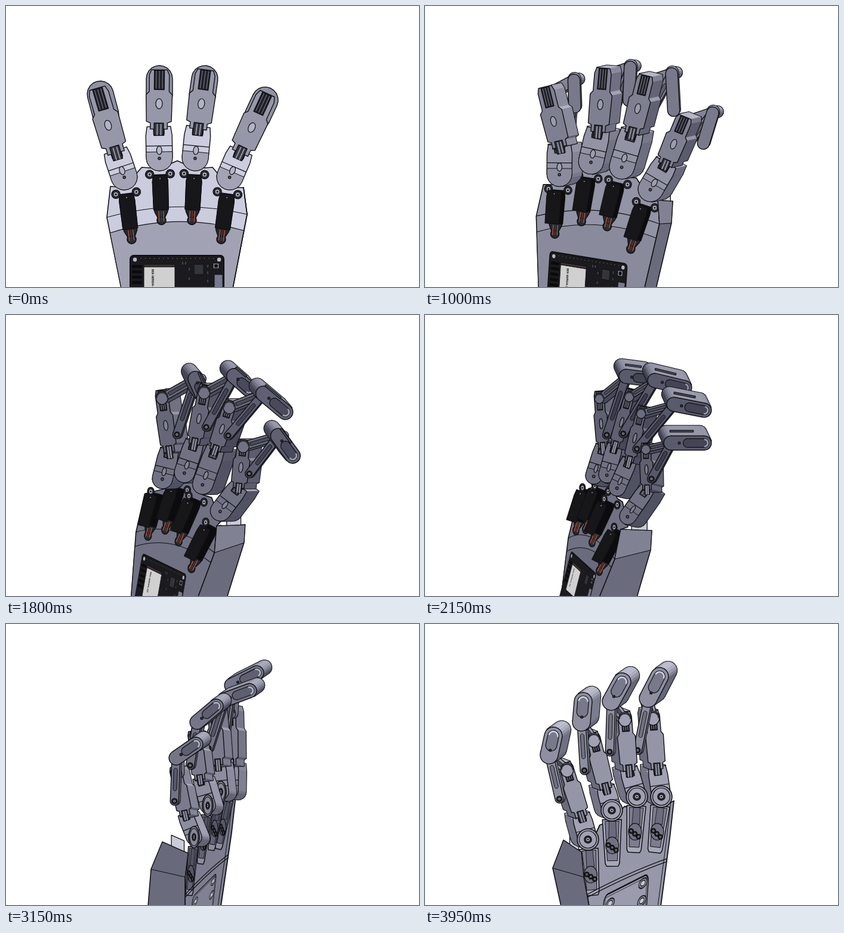
These frames come from a looping animation (692x472 px, 4.4 s). An HTML page with a canvas:

```html
<!DOCTYPE html>
<html lang="en">
<head>
<meta charset="utf-8">
<title>Robot hand</title>
<style>
html, body { margin: 0; width: 100%; height: 100%; overflow: hidden; background: #fff; }
canvas { display: block; }
</style>
</head>
<body>
<canvas id="stage" width="692" height="472"></canvas>
<script>
const ctx = document.getElementById('stage').getContext('2d');
const LOOP = 4400, INK = '#101014';

// Start of each evenly turned step, in ms.
const STEPS = [0, 250, 400, 600, 700, 850, 1000, 1150, 1300, 1400, 1550, 1700, 1800, 1900, 2050, 2150,
  2300, 2400, 2500, 2600, 2700, 2800, 2950, 3050, 3150, 3250, 3350, 3500, 3600, 3700, 3850, 3950];
const KEYS = [0, 3, 10, 15, 19, 24, 31];

// Joints per key: knuckle, middle joint, upper joint, tip base, tip.
const little = [
  [198,287, 184,245, 157,152, 158,148, 167,182],
  [209,285, 203,238, 178,155, 207,135, 214,180],
  [249,278, 257,232, 241,140, 300,112, 300,150],
  [283,270, 298,222, 292,140, 337,103, 375,108],
  [310,270, 325,215, 323,140, 357,107, 415,96],
  [376,280, 377,235, 375,150, 378,103, 420,82],
  [396,290, 389,242, 382,158, 374,125, 393,88]];
const ring = [
  [257,255, 256,205, 257,120, 257,122, 257,150],
  [266,260, 272,208, 278,115, 312,108, 306,175],
  [294,263, 311,212, 322,125, 375,100, 385,130],
  [305,268, 318,220, 342,137, 385,110, 435,122],
  [314,275, 325,222, 342,140, 384,122, 445,125],
  [360,282, 355,235, 348,150, 365,128, 408,112],
  [355,290, 342,245, 335,160, 312,130, 330,97]];
const middle = [
  [317,255, 322,205, 333,120, 333,122, 329,150],
  [325,262, 338,212, 354,118, 388,112, 378,178],
  [333,280, 353,215, 377,147, 432,122, 458,165],
  [322,290, 342,245, 362,165, 417,150, 468,160],
  [320,300, 330,250, 343,175, 378,160, 438,150],
  [338,305, 325,260, 315,190, 320,165, 352,138],
  [313,313, 303,275, 283,195, 262,165, 265,130]];
const index = [
  [375,287, 393,245, 432,160, 434,158, 421,186],
  [380,297, 403,250, 440,180, 473,168, 450,212],
  [370,322, 397,285, 412,215, 476,195, 480,245],
  [340,338, 372,292, 370,225, 412,215, 468,215],
  [325,340, 332,300, 328,235, 357,226, 413,212],
  [315,358, 300,320, 285,250, 285,225, 318,202],
  [273,362, 262,322, 238,245, 208,220, 215,188]];
const FINGERS = [little, ring, middle, index];

// Palm edges: far edge, near back edge, near front edge (top, bend, x at the bottom).
const PALM = [
  [175,303, 169,355, 193, 398,305, 404,350, 380, 398,305, 404,350, 380],
  [186,300, 175,350, 187, 402,310, 406,350, 383, 413,315, 412,358, 390],
  [218,300, 205,360, 200, 368,348, 368,390, 340, 410,345, 408,375, 378],
  [258,300, 240,375, 228, 328,360, 318,410, 292, 380,362, 378,395, 355],
  [292,295, 270,400, 250, 300,365, 288,415, 267, 350,372, 345,402, 330],
  [385,288, 378,350, 360, 262,366, 243,412, 238, 305,385, 300,425, 300],
  [417,297, 410,360, 395, 232,363, 214,410, 228, 262,383, 266,425, 275]];

// Tones, half widths, depth of segment and tip, link offset, servo direction, spread, half width.
const LOOK = [
  [150,203, 22,22,22,  0,0,   0,0,    0,0,   -1,105,-9, 13],
  [140,172, 20,22,10, 12,-3,  8,2,   20,-5, -10,102,-8, 13],
  [108,118, 16,19,13, 20,-3, -10,-9, 20,-8, -33,98,-9, 11],
  [95,112,  11,14,12, 17,4,  -8,-17,  8,0,  -39,92,-6, 9],
  [98,108,  11,13,12, 12,3,  -3,-13,  4,0,  -40,80,-5, 7],
  [122,140, 13,13,12, 13,2,  13,-9, -14,-5, -14,96,4, 8],
  [148,160, 15,16,15, -13,-5, 14,-10, -31,-9, -2,92,6, 16]];

// Plate on the palm: corner, right edge, down edge.
const PLATE = [
  [208,419, 157,0, 0,100], [205,417, 152,13, -3,100], [220,405, 93,30, -12,100],
  [245,397, 42,38, -22,85], [262,408, 6,10, -12,70], [313,458, 40,-40, -8,70], [300,457, 75,-38, -6,90]];

const add = (a, b, k = 1) => [a[0] + b[0] * k, a[1] + b[1] * k];
const mix = (a, b, k) => [a[0] + (b[0] - a[0]) * k, a[1] + (b[1] - a[1]) * k];
const pairs = a => a.flatMap((x, i) => i % 2 ? [] : [[x, a[i + 1]]]);
const grey = g => `rgb(${g | 0},${g + 2 | 0},${Math.min(255, g + 19) | 0})`;
const area = p => p.reduce((s, a, i) => {
  const b = p[(i + 1) % p.length];
  return s + a[0] * b[1] - b[0] * a[1];
}, 0);

// Smooth path through the keys.
function at(rows, s) {
  let i = 0;
  while (i < KEYS.length - 2 && s >= KEYS[i + 1]) i++;
  const span = KEYS[i + 1] - KEYS[i], k = (s - KEYS[i]) / span;
  const slope = (n, c) => {
    const a = Math.max(0, n - 1), b = Math.min(KEYS.length - 1, n + 1);
    return (rows[b][c] - rows[a][c]) / (KEYS[b] - KEYS[a]) * span;
  };
  return rows[i].map((p, c) => {
    const q = rows[i + 1][c], d = q - p, m = slope(i, c), n = slope(i + 1, c);
    return p + k * m + k * k * (3 * d - 2 * m - n) + k * k * k * (m + n - 2 * d);
  });
}

function shape(pts, fill, line = 1.4, ink = INK) {
  ctx.beginPath();
  pts.forEach(p => ctx.lineTo(...p));
  ctx.closePath();
  if (fill) { ctx.fillStyle = fill; ctx.fill(); }
  if (line) { ctx.lineWidth = line; ctx.strokeStyle = ink; ctx.stroke(); }
}

function stroke(pts, width = 1.2, ink = INK) {
  ctx.beginPath();
  pts.forEach(p => ctx.lineTo(...p));
  ctx.lineWidth = width;
  ctx.strokeStyle = ink;
  ctx.stroke();
}

function oval(p, rx, ry, fill, turn = 0, line = 1.2) {
  ctx.beginPath();
  ctx.ellipse(...p, Math.abs(rx), Math.abs(ry), turn, 0, 7);
  ctx.fillStyle = fill;
  ctx.fill();
  if (line) { ctx.lineWidth = line; ctx.strokeStyle = INK; ctx.stroke(); }
}

function bolt(p, r, rx = r) {
  oval(p, rx, r, '#33343c', 0, 1.5);
  oval(p, rx * .6, r * .6, '#a9abb8');
  oval(p, rx * .22, r * .22, INK, 0, 0);
}

const angle = (a, b) => Math.atan2(b[1] - a[1], b[0] - a[0]);
const arc = (c, r, from) => Array.from({ length: 11 }, (_, i) => {
  const t = from + i * Math.PI / 10;
  return add(c, [Math.cos(t), Math.sin(t)], r);
});
function pill(a, b, r) {
  const t = angle(a, b);
  return [...arc(b, r, t - Math.PI / 2), ...arc(a, r, t + Math.PI / 2)];
}

// Local frame of a segment: x across in half widths, y along from a to b.
function frame(a, b, w) {
  const t = angle(a, b), side = [-Math.sin(t) * w, Math.cos(t) * w];
  return (x, y) => add(mix(a, b, y), side, x);
}

// Flat face pushed back along v, lit from above.
function prism(pts, v, g, face = grey(g)) {
  const sign = Math.sign(area(pts)) || 1, sides = [];
  pts.forEach((a, i) => {
    const b = pts[(i + 1) % pts.length], l = Math.hypot(b[0] - a[0], b[1] - a[1]) || 1;
    const nx = sign * (b[1] - a[1]) / l, ny = sign * (a[0] - b[0]) / l;
    if (nx * v[0] + ny * v[1] > .1)
      sides.push([[a, b, add(b, v), add(a, v)], grey(g * .72 + 95 * Math.max(0, nx * .3 - ny * .9))]);
  });
  sides.forEach(([q]) => shape(q, null, 2.6));
  sides.forEach(([q, c]) => shape(q, c, .5, c));
  shape(pts, face);
}

function proximal(K, P, o) {
  const m = frame(K, P, o.pw), round = arc(K, o.pw, angle(K, P) + Math.PI / 2);
  prism([...round, m(-1, .75), m(-.9, 1.05), m(-.4, 1.05), m(-.4, .8), m(.4, .8), m(.4, 1.05),
    m(.9, 1.05), m(1, .75)], o.v, o.top);
  shape([m(-.38, .75), m(-.38, 1.1), m(.38, 1.1), m(.38, .75)], '#3c3d47');
  for (const x of [-.15, .15]) stroke([m(x, .78), m(x, 1.1)], 2.5, grey(o.g + 10));
  shape([...round, m(-1, .2), m(1, .2)], grey(o.g + 12), 1);
  stroke([m(-1, .4), m(1, .4)]);
  if (o.back) {
    oval(m(0, .25), o.pw * .2, 7, grey(o.g + 30), angle(K, P) + Math.PI / 2);
    oval(m(0, -.02), 2.2, 2.2, '#555664');
  }
}

function medial(P, D, o) {
  const m = frame(P, D, o.mw), turn = angle(P, D) + Math.PI / 2;
  prism([m(-.65, -.02), m(-.65, .1), m(-.95, .13), m(-1, .66), m(-.76, .72), m(-.76, 1.05),
    m(-.6, 1.15), m(.6, 1.15), m(.76, 1.05), m(.76, .72), m(1, .66), m(.95, .13), m(.65, .1),
    m(.65, -.02)], o.v, o.g);
  shape([m(-.36, -.14), m(-.36, .1), m(.36, .1), m(.36, -.14)], '#33343d');
  for (const x of [-.12, .16]) stroke([m(x, -.14), m(x, .08)], 2, '#9699aa');
  shape([m(-.38, .76), m(-.38, 1.14), m(.38, 1.14), m(.38, .76)], '#202127');
  for (let x = -.24; x < .3; x += .24) stroke([m(x, .78), m(x, 1.13)], 1, '#85879a');
  if (o.back) oval(m(0, .48), o.mw * .25, 8.5, grey(o.g + 28), turn);
}

function tip(E, T, o) {
  prism(pill(E, T, o.tr), o.tv, o.g - 6);
  if (o.early) return;
  shape(pill(mix(E, T, .5), T, o.tr * .62), grey(o.g - 28), 1.2);
  stroke(arc(T, o.tr * .5, angle(E, T) - Math.PI / 2), 2.5, grey(o.g + 60));
  oval(mix(E, T, .25), 2, 2, '#30313a');
  const m = frame(add(E, o.tv, .55), add(T, o.tv, .55), o.tr);
  if (o.s < 22) shape([m(-1, .05), m(-.75, .05), m(-.75, .75), m(-1, .75)], '#4e505e', 1.2);
}

function arm(D, E, o) {
  prism(pill(D, E, o.mw * .5), [o.v[0] * .5, o.v[1] * .5], o.g + 4);
  if (o.early) return;
  const m = frame(D, E, o.mw * .5);
  shape([m(-.4, .2), m(-.4, .8), m(.4, .8), m(.4, .2)], '#4b4d5a', 1);
  oval(D, o.mw * .72, o.mw * .8, grey(o.g + 12));
  stroke(arc(D, o.mw * .65, -Math.PI), 2.5, '#292a31');
}

function link(P, D, E, o) {
  const L = add(mix(P, D, .25), o.lv);
  prism(pill(L, E, 7), [2, -1], o.g - 8);
  shape(pill(mix(L, E, .28), mix(L, E, .72), 3), grey(o.g - 35), 1);
  bolt(L, 4.5);
  bolt(E, 4.5);
}

function finger([K, P, D, E, T], o) {
  const far = () => { arm(D, E, o); link(P, D, E, o); tip(E, T, o); };
  if (o.early) far();
  proximal(K, P, o);
  medial(P, D, o);
  if (!o.early) far();
  if (o.front) {
    oval(K, o.sw * 1.12, 18, grey(o.g + 5), 0, 1.6);
    oval(K, o.sw * .9, 14.5, grey(o.g + 12));
    bolt(K, 6, o.sw * .38);
  }
}

function servo(K, f, o, lift) {
  const dir = [o.u[0] + (f - 1.5) * o.sp, o.u[1]], end = add(K, dir);
  const m = frame(K, end, o.sw), shift = [lift, 0];
  oval(end, o.sw * .58, 7.5, '#292a30', 0, 1.5);
  shape([m(-.85, .27), m(.85, .27), m(.85, .86), m(.5, .95), m(-.5, .95), m(-.85, .86)], '#25262c');
  for (const x of [-.3, 0, .3]) stroke([m(x, .85), m(x, 1.02)], 1.4, x ? '#a85640' : '#6b3327');
  for (const x of [-1.33, 1.33]) bolt(m(x, .26), 7, o.sw * .54);
  const body = [m(-.88, .28), m(.88, .28), m(1, .38), m(.95, .83), m(-.95, .83), m(-1, .38)];
  shape(body, '#0c0c0e');
  shape(body.map(p => add(p, shift)), '#171719', 1.2);
  oval(add(m(0, .33), shift), 1.5, 1.5, '#c8c9d2');
}

function slot(K, f, o) {
  const end = add(K, [o.u[0] + (f - 1.5) * o.sp, o.u[1]]), m = frame(K, end, o.sw);
  shape([m(-1, .17), m(1, .17), m(.75, .97), m(.6, 1.02), m(-.6, 1.02), m(-.75, .97)], grey(o.g + 18), 1.5);
  shape([m(-.75, .2), m(.72, .2), m(.52, .92), m(-.52, .92)], grey(o.g - 24), 1);
  shape([m(-.4, .2), m(.3, .2), m(.35, .5), m(-.45, .5)], grey(o.g - 42), .8);
  const hub = m(0, .64);
  oval(hub, o.sw * .68, 14, grey(o.g - 36));
  for (const x of [-.4, 0, .4]) bolt(m(x, .68 - x * .12), 4, o.sw * .24);
}

// Plate space is 157 by 100 units.
function onPlate(p, draw) {
  ctx.save();
  ctx.transform(p[2] / 157, p[3] / 157, p[4] / 100, p[5] / 100, p[0], p[1]);
  draw();
  ctx.restore();
}

function block(x, y, w, h, fill, line = 1) {
  shape([[x, y], [x + w, y], [x + w, y + h], [x, y + h]], fill, line);
}

function board() {
  ctx.beginPath();
  ctx.roundRect(0, 0, 157, 120, 6);
  ctx.fillStyle = '#1b1b1f';
  ctx.fill();
  ctx.lineWidth = 2;
  ctx.strokeStyle = INK;
  ctx.stroke();
  for (let x = 18; x < 142; x += 7.6) oval([x, 5], 1.8, 1.8, '#51453a', 0, 1);
  for (const x of [8, 149]) oval([x, 7], 4, 4, '#b4b6c2');
  for (let y = 16; y < 60; y += 9) block(3, y, 17, 5, '#0b0b0c', 0);
  block(23, 19, 52, 50, '#d0d0d0');
  block(23, 15, 52, 4, '#42342f');
  block(107, 15, 16, 17, '#34353b');
  for (const [x, y] of [[86, 10], [91, 10], [97, 20], [97, 36], [128, 15], [128, 26], [128, 40]])
    block(x, y, 4, 6, '#3d3e46');
  block(139, 13, 10, 9, '#84869a');
  block(141, 32, 14, 22, '#777a8d');
  oval([144, 17.5], 2.5, 2.5, INK);
  ctx.save();
  ctx.translate(36, 23);
  ctx.rotate(Math.PI / 2);
  ctx.fillStyle = '#151515';
  ctx.font = 'bold 6px "Liberation Sans", sans-serif';
  ctx.fillText('MX-WR04-32', 0, 0);
  ctx.restore();
}

function cover(o) {
  ctx.beginPath();
  ctx.roundRect(0, 0, 157, 130, 14);
  ctx.fillStyle = grey(o.g + 6);
  ctx.fill();
  ctx.lineWidth = 3;
  ctx.strokeStyle = INK;
  ctx.stroke();
  ctx.lineWidth = 1;
  ctx.strokeRect(5, 5, 147, 120);
  for (const [x, y] of [[138, 13], [138, 46], [24, 20]]) {
    oval([x, y], 15, 9, '#7d7f90', 0, 2);
    oval([x, y], 8, 5, '#c7c9d6', 0, 1.5);
  }
}

function palm(p, knuckles, plate, o) {
  const [a, a2, b, b2, e, e2] = [0, 2, 5, 7, 10, 12].map(i => [p[i], p[i + 1]]);
  const [d, c, g] = [4, 9, 14].map(i => [p[i], 474]);
  const [k1, k2, k3, k4] = knuckles, dip = k => add(k, [0, 18]);
  const crest = [dip(k4), mix(k3, k4, .5), dip(k3), add(mix(k2, k3, .5), [0, 5]), dip(k2), mix(k1, k2, .5), dip(k1)];
  const back = [a, a2, d, c, b2, b], front = [e, e2, g, d, a2, a];
  o.back = area(back) < 0;
  o.front = area(front) < 0;
  if (o.back) {
    shape([...back, ...crest], grey(o.top), 1.6);
    const l = mix(a2, d, .22), r = mix(b2, c, .22), rise = add(mix(l, r, .5), [0, -34]);
    ctx.beginPath();
    ctx.moveTo(...l);
    ctx.quadraticCurveTo(...rise, ...r);
    ctx.lineTo(...c);
    ctx.lineTo(...d);
    ctx.closePath();
    ctx.fillStyle = grey(o.g + 11);
    ctx.fill();
    ctx.lineWidth = 1.1;
    ctx.strokeStyle = INK;
    ctx.stroke();
    ctx.beginPath();
    ctx.moveTo(...a2);
    ctx.quadraticCurveTo(...add(rise, [0, -23]), ...b2);
    ctx.stroke();
    onPlate(plate, board);
    knuckles.forEach((k, f) => servo(k, f, o, (b[0] - e[0]) * .25));
  }
  if (o.front) {
    shape([...front, ...crest.reverse()], grey(o.g + 2), 1.8);
    stroke([mix(a, [a[0] - 5, a[1]], 1), add(a2, [-5, 0]), add(d, [-5, 0])], 1);
    knuckles.forEach((k, f) => slot(k, f, o));
    const l = mix(e2, g, .6), r = mix(a2, d, .3);
    for (const y of [0, 5]) {
      ctx.beginPath();
      ctx.moveTo(l[0], l[1] + y);
      ctx.quadraticCurveTo(...add(mix(l, r, .55), [0, y - 6]), r[0], r[1] + y);
      ctx.lineWidth = 1.3;
      ctx.strokeStyle = INK;
      ctx.stroke();
    }
    onPlate(plate, () => cover(o));
  }
  shape([b, b2, c, g, e2, e], grey(106), 1.6);
  shape([b, b2, e2, e], grey(o.front ? 104 : 128), 1.1);
  const hinge = [mix(b, e, .35), mix(b, e, .85)];
  if (e[0] - b[0] > 12)
    shape([...hinge, add(hinge[1], [0, -18]), add(hinge[0], [0, -18])], '#c9cbd8', 1.3);
}

function draw(s) {
  const [g, top, mw, pw, tr, vx, vy, tx, ty, lx, ly, ux, uy, sp, sw] = at(LOOK, s);
  const o = { s, g, top, mw, pw, tr, v: [vx, vy], tv: [tx, ty], lv: [lx, ly], u: [ux, uy], sp, sw, early: s < 8 };
  const joints = FINGERS.map(f => pairs(at(f, s)));
  ctx.fillStyle = '#fff';
  ctx.fillRect(0, 0, 692, 472);
  ctx.lineJoin = 'round';
  palm(at(PALM, s), joints.map(j => j[0]), at(PLATE, s), o);
  joints.forEach(j => finger(j, o));
}

const start = performance.now();
let shown = -1;
function tick() {
  const t = (performance.now() - start) % LOOP;
  const s = STEPS.findLastIndex(x => x <= t);
  if (s !== shown) draw(shown = s);
  requestAnimationFrame(tick);
}
tick();
</script>
</body>
</html>
```
